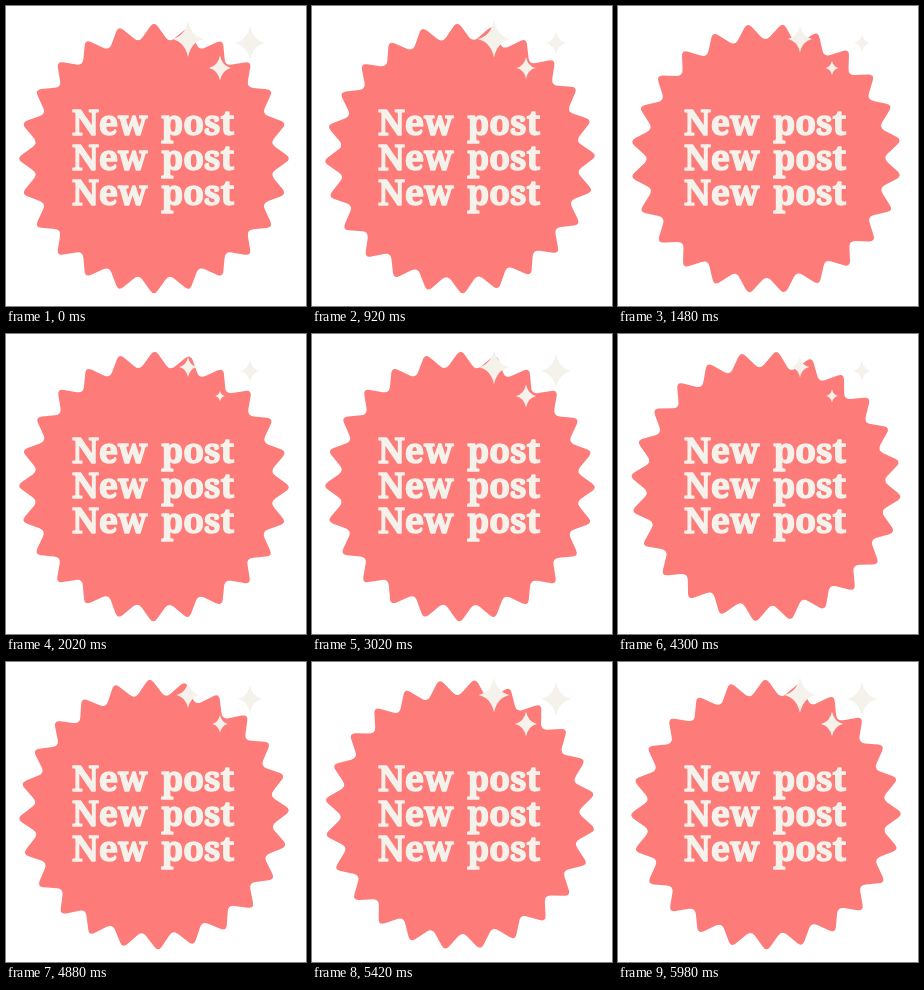
Write an HTML page that moves like this. It is 300 px wide and 300 px high and loops after 6000 ms.

```html
<!DOCTYPE html>
<html lang="en">
<head>
<meta charset="utf-8">
<title>New post</title>
<style>
  html, body { margin: 0; width: 100%; height: 100%; overflow: hidden; background: #fff; }
  svg { display: block; width: 100vw; height: 100vh; }
  #badge { fill: #fd7b79; }
  .cream { fill: #f5f2ec; }
  text {
    font: 800 34px "Noto Serif", "Liberation Serif", serif;
    word-spacing: 5px;
    text-anchor: middle;
    stroke: #f5f2ec;
    stroke-width: 1.4;
    stroke-linejoin: round;
  }
</style>
</head>
<body>
<svg viewBox="0 0 300 300">
  <path id="badge"/>
  <g class="cream">
    <text x="147.2" y="128.5">New post</text>
    <text x="147.2" y="164">New post</text>
    <text x="147.2" y="199">New post</text>
  </g>
  <g id="sparkles" class="cream"></g>
</svg>
<script>
const LOOP = 6000;
const TEETH = 24;
const TURN = 90; // degrees per loop, a whole number of teeth

const badge = document.getElementById("badge");
const layer = document.getElementById("sparkles");

// keys: [time, radius]
const sparkles = [
  { x: 182, y: 33, keys: [[0, 18], [750, 19], [2050, 10], [3400, 19], [4350, 10.5], [5750, 18.5], [LOOP, 18]] },
  { x: 244, y: 37, keys: [[0, 17], [1500, 9], [3050, 17], [4250, 10], [5450, 17], [LOOP, 17]] },
  { x: 214, y: 62, keys: [[0, 12.5], [400, 12.5], [2000, 5.5], [3350, 12.5], [4400, 6.5], [5500, 12.5], [LOOP, 12.5]] }
];

function mix(a, b, amount) {
  return a + (b - a) * amount;
}

// A star whose tips and valleys are rounded by quadratic curves.
function badgePath(outer, inner, rounding) {
  const count = TEETH * 2;
  const corner = i => {
    const angle = i * Math.PI / TEETH;
    const radius = i % 2 ? inner : outer;
    return [radius * Math.sin(angle), -radius * Math.cos(angle)];
  };
  const between = (a, b) => a.map((v, k) => mix(v, b[k], rounding));
  const text = point => point.map(v => v.toFixed(2)).join(" ");
  let path = "";
  for (let i = 0; i < count; i++) {
    const [before, here, after] = [corner(i + count - 1), corner(i), corner(i + 1)];
    path += `${i ? "L" : "M"}${text(between(here, before))}Q${text(here)} ${text(between(here, after))}`;
  }
  return path + "Z";
}

function valueAt(keys, t) {
  const next = keys.findIndex(([time]) => time > t);
  const [t0, v0] = keys[next - 1];
  const [t1, v1] = keys[next];
  return mix(v0, v1, (1 - Math.cos(Math.PI * (t - t0) / (t1 - t0))) / 2);
}

badge.setAttribute("d", badgePath(137.5, 117, 0.25));
for (const sparkle of sparkles) {
  sparkle.node = document.createElementNS("http://www.w3.org/2000/svg", "path");
  sparkle.node.setAttribute("d", "M0-1Q.17-.17 .88 0Q.17 .17 0 1Q-.17 .17-.88 0Q-.17-.17 0-1Z");
  layer.append(sparkle.node);
}

function draw(t) {
  badge.setAttribute("transform", `translate(148 152.5) rotate(${TURN * t / LOOP})`);
  for (const { x, y, keys, node } of sparkles) {
    node.setAttribute("transform", `translate(${x} ${y}) scale(${valueAt(keys, t)})`);
  }
}

const start = performance.now();
function tick() {
  draw((performance.now() - start) % LOOP);
  requestAnimationFrame(tick);
}
tick();
</script>
</body>
</html>
```
